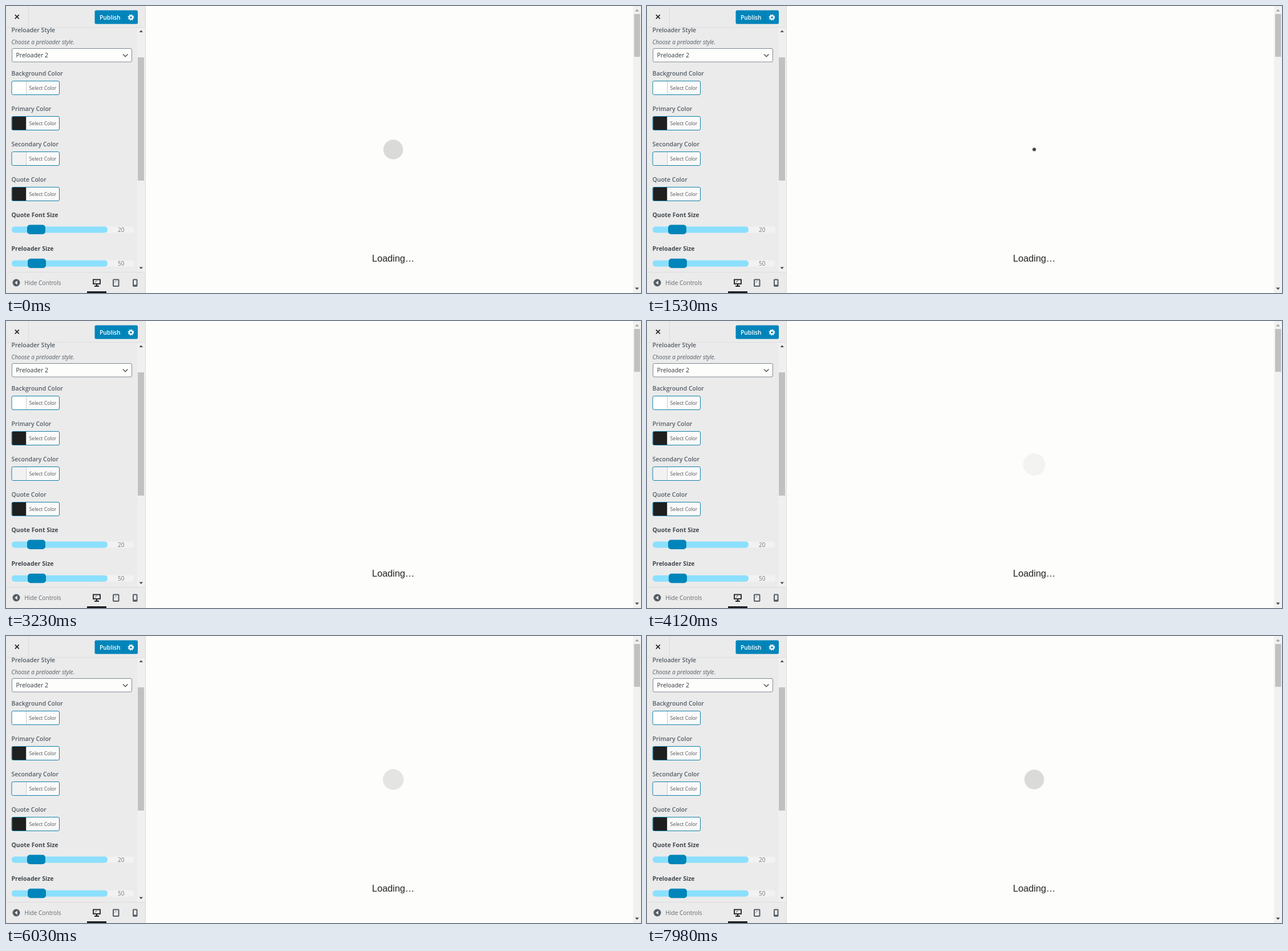
Animation, 1113 px wide and 503 px high, one loop 8 s. Source, as an HTML page:

```html
<!DOCTYPE html>
<html lang="en">
<head>
<meta charset="utf-8">
<title>Preloader settings</title>
<style>
  html, body { margin: 0; width: 100%; height: 100%; overflow: hidden; background: #fdfdfc; }
  svg { display: block; width: 1113px; height: 503px; --t: 0s; }
  text { font: 10.5px "Open Sans", "Noto Sans", sans-serif; fill: #555d66; }
  .label { font-weight: 600; }
  .strong { font-weight: 700; fill: #43484d; }
  .hint { font-size: 10px; font-style: italic; }
  .small { font-size: 8.7px; fill: #555; }
  .value { font-size: 10px; fill: #777; }
  .loading { font: 16.3px "Liberation Sans", Arial, sans-serif; fill: #222; text-anchor: middle; }

  /* Both animations are positioned by --t, the clock set by the script. */
  .pulse {
    fill: #1c1c1c;
    transform-origin: 678.7px 251.5px;
    animation: pulse 1s ease-in-out infinite paused;
    animation-delay: calc(var(--t) * -1 - .727s);
  }
  .cursor {
    animation: pass 8s linear infinite paused;
    animation-delay: calc(var(--t) * -1);
  }
  @keyframes pulse {
    from { transform: scale(0); opacity: 1; }
    to { transform: scale(1); opacity: 0; }
  }
  @keyframes pass {
    0%, 8.5% { transform: translate(1040px, -30px); }
    8.51% { transform: translate(1040px, 8px); }
    9.375% { transform: translate(1040px, -1px); }
    10.2%, 100% { transform: translate(1040px, -30px); }
  }
</style>
</head>
<body>
<svg id="stage" viewBox="0 0 1113 503">
  <rect width="1113" height="503" fill="#fdfdfc"/>

  <!-- preview -->
  <circle class="pulse" cx="678.7" cy="251.5" r="20.4"/>
  <text class="loading" x="678.7" y="448">Loading…</text>
  <rect x="1099" width="14" height="503" fill="#f1f1f1"/>
  <rect x="1101" y="14" width="10.500" height="75" fill="#c1c1c1"/>
  <path d="M1102.500 9.500h7l-3.500-4z" fill="#a3a3a3"/>
  <path d="M1102.500 493.500h7l-3.500 4z" fill="#505050"/>

  <!-- sidebar -->
  <rect width="244" height="503" fill="#ebebeb"/>
  <rect x="230" y="38" width="14" height="428" fill="#f0f0f0"/>
  <rect x="231" y="90" width="11" height="216" fill="#c1c1c1"/>
  <path d="M233.500 46h6.500l-3.250-3.800zM233.500 457.500h6.500l-3.250 3.800z" fill="#505050"/>
  <path d="M244.500 0V503M0 37.500H244M0 466.500H244M39.500 0V37" stroke="#dcdcdc" fill="none"/>

  <!-- header -->
  <path d="M15.800 15.300l7 7m0-7l-7 7" stroke="#23282d" stroke-width="1.700"/>
  <rect x="155.500" y="7.500" width="75.500" height="24" rx="2.500" fill="#0085ba"/>
  <path d="M206.500 8V31" stroke="#007bad"/>
  <text class="label" x="164" y="23.800" style="fill:#fff;font-size:10.300px">Publish</text>
  <g transform="translate(219 20)">
    <circle r="3" fill="none" stroke="#fff" stroke-width="2.400"/>
    <circle r="4.600" fill="none" stroke="#fff" stroke-width="1.700" stroke-dasharray="1.800 1.813"/>
  </g>

  <!-- preloader style -->
  <text class="label" x="9.500" y="46.200">Preloader Style</text>
  <text class="hint" x="9.500" y="66.700">Choose a preloader style.</text>
  <rect x="10.500" y="74.500" width="210" height="23.500" rx="2.500" fill="#fdfdfc" stroke="#7e8993"/>
  <text x="17.500" y="90" style="fill:#32373c">Preloader 2</text>
  <path d="M205 84.500l4.200 4.200l4.200-4.200" fill="none" stroke="#555" stroke-width="1.600"/>

  <g id="controls"></g>

  <!-- footer -->
  <circle cx="18" cy="485" r="6.500" fill="#555d66"/>
  <path d="M19.800 481.600v6.800l-4.600-3.400z" fill="#ebebeb"/>
  <text x="32.500" y="489" style="font-size:10.100px;fill:#656a6f">Hide Controls</text>
  <rect x="142" y="500" width="34" height="3" fill="#191e23"/>
  <g fill="none" stroke="#191e23">
    <rect x="153" y="479.500" width="12" height="7.500" stroke-width="1.800"/>
    <path d="M159 487v3M155 491h8" stroke-width="2"/>
    <path d="M155.500 484.500l4-3" stroke-width=".8"/>
  </g>
  <g fill="none" stroke="#555d66">
    <rect x="188" y="479.500" width="9.500" height="11.500" rx=".8" stroke-width="2"/>
    <path d="M190 485l3.500-3.500" stroke-width=".8"/>
    <rect x="223" y="479.500" width="6.500" height="11.500" rx=".8" stroke-width="2"/>
    <path d="M223 489.500h6.500" stroke-width="2"/>
  </g>

  <path class="cursor" d="M.5.500V12.600l2.800-2.500l1.900 4.100l1.900-.9l-1.900-3.900h3.700z" fill="#fff" stroke="#222" stroke-width="1"/>
</svg>
<script>
  const stage = document.getElementById("stage");

  const picker = (name, y, color) => `
    <text class="label" x="9.500" y="${y - 9}">${name}</text>
    <rect x="10" y="${y + .5}" width="83.500" height="24" rx="2.500" fill="#fafafa"/>
    <rect x="10.500" y="${y + 1}" width="25" height="23" fill="${color}"/>
    <path d="M35.500 ${y + 1}v23" stroke="#ccc"/>
    <rect x="10" y="${y + .5}" width="83.500" height="24" rx="2.500" fill="none" stroke="#1180a8"/>
    <text class="small" x="40.500" y="${y + 15.5}">Select Color</text>`;

  const slider = (name, y, knob, value) => `
    <text class="strong" x="9.500" y="${y - 22}">${name}</text>
    <rect x="168" y="${y - 5.5}" width="57" height="11" rx="5" fill="#f2f2f2"/>
    <rect x="10" y="${y - 5.5}" width="168" height="11" rx="5" fill="#8be0fd"/>
    <rect x="${knob}" y="${y - 8.5}" width="32" height="16.500" rx="5" fill="#0085ba"/>
    <text class="value" x="196" y="${y + 3.7}">${value}</text>`;

  document.getElementById("controls").innerHTML = [
    picker("Background Color", 131, "#fff"),
    picker("Primary Color", 193, "#1f1f1f"),
    picker("Secondary Color", 255, "#f2f2f2"),
    picker("Quote Color", 317, "#1f1f1f"),
    slider("Quote Font Size", 392, 37, 20),
    slider("Preloader Size", 451.300, 38, 50)
  ].join("");

  // The clock advances at 24 pictures per second.
  const loop = 8000, fps = 24, lead = 20;
  const start = performance.now();

  function draw() {
    const ms = (performance.now() - start) % loop;
    const step = Math.floor((ms + lead) * fps / 1000);
    stage.style.setProperty("--t", step / fps + "s");
    requestAnimationFrame(draw);
  }
  draw();
</script>
</body>
</html>
```
